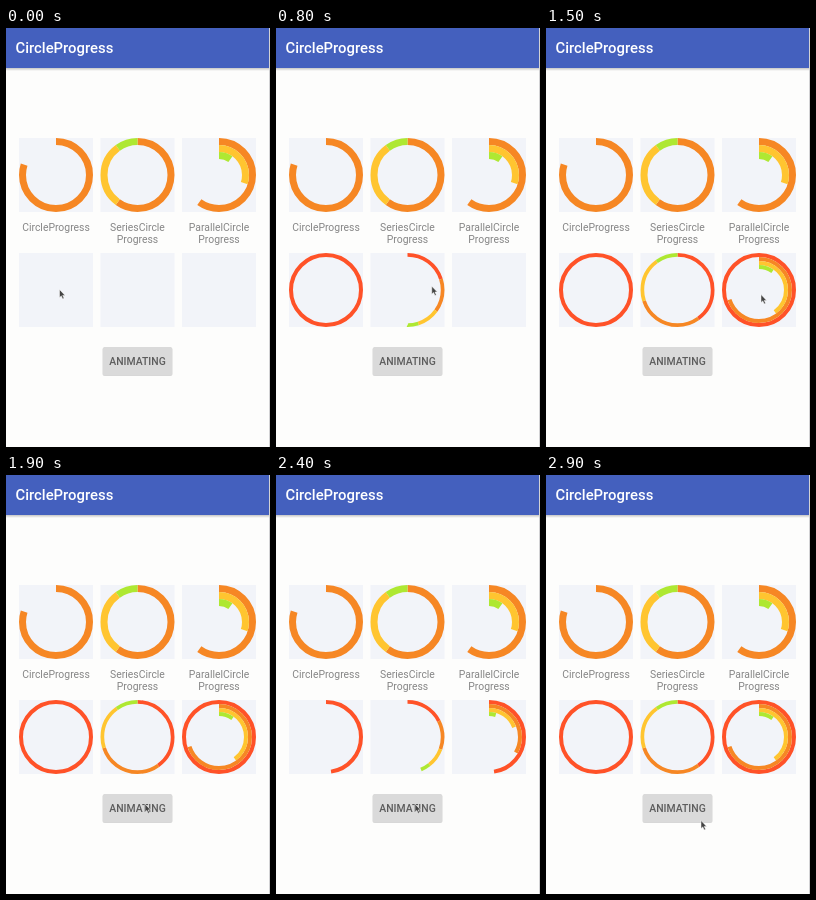
These frames come from a looping animation (264 by 419 pixels, 3 s). An HTML page:

```html
<!DOCTYPE html>
<html lang="en">
<head>
<meta charset="utf-8">
<title>CircleProgress</title>
<style>
  html, body { margin: 0; width: 100%; height: 100%; overflow: hidden; background: #fdfdfc; }
  svg { display: block; }
  text { font: 10.4px Roboto, sans-serif; fill: #868686; text-anchor: middle; }
  .title { font-size: 14.85px; font-weight: 500; fill: #fff; text-anchor: start; }
  .button { font-weight: 500; fill: #5c5c5c; }
</style>
</head>
<body>
<svg width="264" height="419" viewBox="0 0 264 419">
  <defs>
    <linearGradient id="shade" x2="0" y2="1">
      <stop stop-color="#000" stop-opacity=".22"/>
      <stop offset="1" stop-color="#000" stop-opacity="0"/>
    </linearGradient>
  </defs>
  <rect width="264" height="419" fill="#fdfdfc"/>
  <rect y="40" width="264" height="3" fill="url(#shade)"/>
  <rect width="264" height="40" fill="#4460be"/>
  <rect x="263" width="1" height="419" fill="#d2d2d4"/>
  <text class="title" x="9.5" y="25">CircleProgress</text>
  <g id="cells"></g>
  <text x="50" y="203">CircleProgress</text>
  <text x="131.5" y="203">SeriesCircle</text>
  <text x="131.5" y="215">Progress</text>
  <text x="213" y="203">ParallelCircle</text>
  <text x="213" y="215">Progress</text>
  <rect x="96.5" y="319.5" width="70" height="28.5" rx="2" fill="#000" opacity=".15"/>
  <rect x="97" y="319" width="69" height="28" rx="1.5" fill="#dadada"/>
  <text class="button" x="131.5" y="336.5">ANIMATING</text>
  <g id="pointer">
    <circle id="click" r="12" fill="none" stroke="#000" stroke-width="1.7"/>
    <path d="M0 0V8L1.8 6.4L3.2 9.4L4.6 8.8L3.2 5.9H5.6Z" fill="#444" stroke="#fff" stroke-width=".7" stroke-opacity=".7"/>
  </g>
</svg>
<script>
const RED = '#ff5228', ORANGE = '#f68724', YELLOW = '#ffc530', GREEN = '#aee832';
const CENTERS = [50, 131.5, 213], TOP = 147, BOTTOM = 262;
const LOOP = 3000, STEP = 100;
const cells = document.getElementById('cells');
const pointer = document.getElementById('pointer');
const click = document.getElementById('click');

function add(tag, attrs) {
  const el = document.createElementNS('http://www.w3.org/2000/svg', tag);
  for (const key in attrs) el.setAttribute(key, attrs[key]);
  return cells.appendChild(el);
}

// An arc covers the fractions from..to of a full turn, clockwise from the top.
function arc(x, y, width, level, color, from, to) {
  const el = add('circle', {
    r: 37 - width * (level + 0.5), fill: 'none', stroke: color, 'stroke-width': width,
    pathLength: 1, transform: `translate(${x} ${y}) rotate(-90)`
  });
  const set = p => {
    const length = (to - from) * p;
    el.style.display = length < 0.009 ? 'none' : '';
    el.setAttribute('stroke-dasharray', `${length} 2`);
    el.setAttribute('stroke-dashoffset', -from * p);
    if (color === RED) el.setAttribute('stroke', p < 0.02 ? ORANGE : RED);
  };
  set(1);
  return set;
}

for (const x of CENTERS)
  for (const y of [TOP, BOTTOM])
    add('rect', { x: x - 37, y: y - 37, width: 74, height: 74, fill: '#f2f4f9' });

const series = (y, width, parts) => {
  let from = 0;
  return parts.map(([color, share]) => arc(CENTERS[1], y, width, 0, color, from, from += share));
};
const parallel = (y, width, parts) =>
  parts.map(([color, share], level) => arc(CENTERS[2], y, width, level, color, 0, share));

const upper = [[ORANGE, 0.6], [YELLOW, 0.3], [GREEN, 0.1]];
arc(CENTERS[0], TOP, 7, 0, ORANGE, 0, 0.8);
series(TOP, 7, upper);
parallel(TOP, 7, upper);

const gauges = [
  { start: 0, restart: 2054, arcs: [arc(CENTERS[0], BOTTOM, 4, 0, RED, 0, 1)] },
  { start: 600, restart: 2072, arcs: series(BOTTOM, 3.7, [[RED, 0.4], [ORANGE, 0.3], [YELLOW, 0.2], [GREEN, 0.1]]) },
  { start: 1100, restart: 2054, arcs: parallel(BOTTOM, 4, [[RED, 1], [ORANGE, 0.7], [YELLOW, 0.4], [GREEN, 0.1]]) }
];

// time, x, y
const path = [
  [0, 53.5, 261.5], [100, 53.5, 261.5], [400, 112, 259], [600, 135, 258], [700, 135, 258],
  [1100, 218, 258.5], [1300, 218, 258.5], [1500, 215, 266.5], [1900, 139, 329],
  [2600, 139, 329], [2900, 155, 345.5], [LOOP, 155, 345.5]
];
const clicks = [600, 1100, 2000];

const ease = t => (1 - Math.cos(Math.PI * Math.min(1, Math.max(0, t)))) / 2;

function draw(t) {
  for (const { start, restart, arcs } of gauges) {
    const p = t < 2050 ? ease((t - start) / 400) : ease((t - restart) / 713);
    arcs.forEach(set => set(p));
  }
  const i = path.findIndex(point => point[0] > t);
  const [t0, x0, y0] = path[i - 1], [t1, x1, y1] = path[i];
  const k = (t - t0) / (t1 - t0);
  pointer.setAttribute('transform', `translate(${x0 + (x1 - x0) * k} ${y0 + (y1 - y0) * k})`);
  click.style.display = clicks.includes(t) ? '' : 'none';
}

function frame() {
  draw(Math.floor(performance.now() % LOOP / STEP) * STEP);
  requestAnimationFrame(frame);
}
frame();
</script>
</body>
</html>
```
